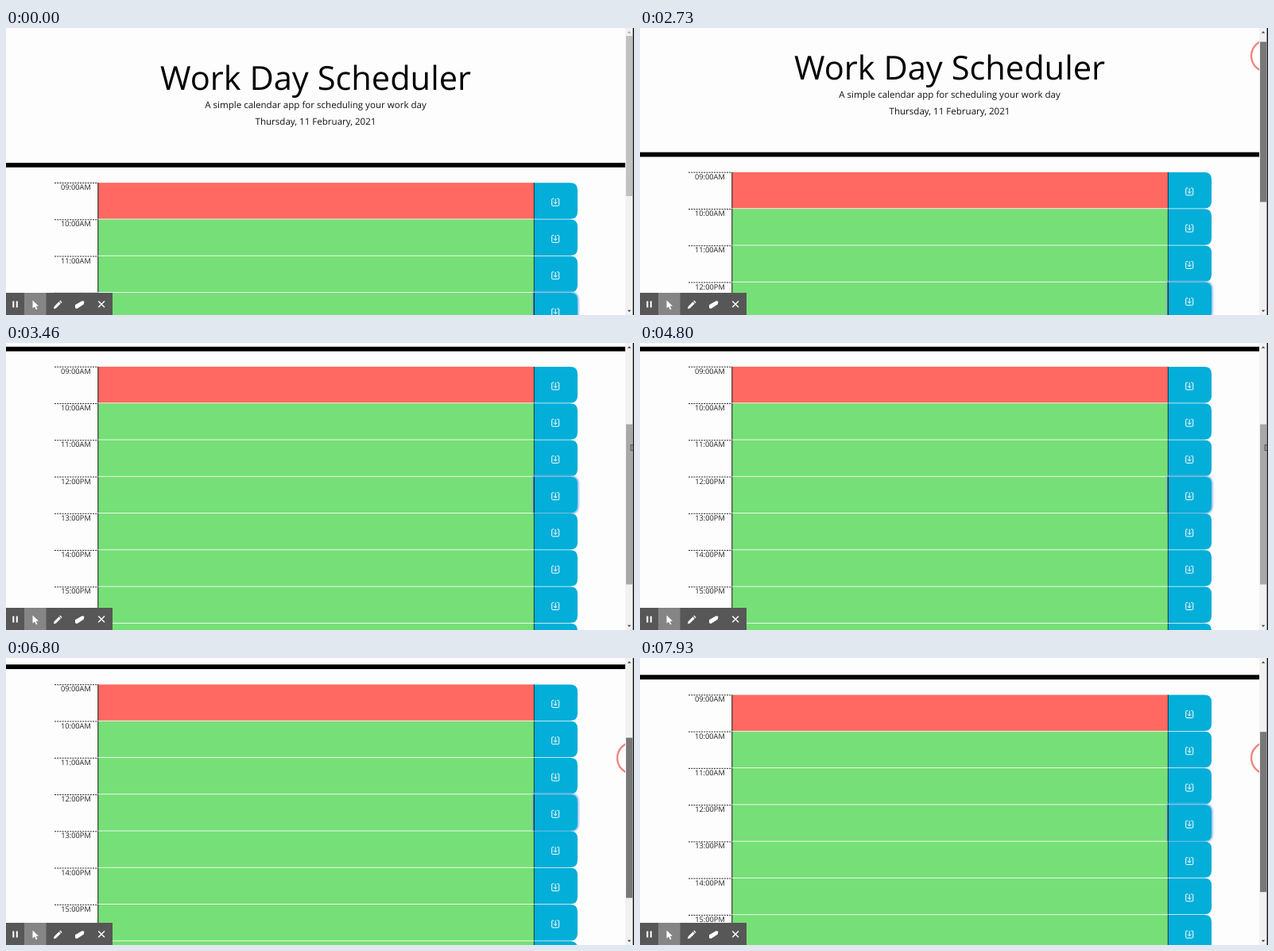
Recreate the animation shown at these times as an HTML page. Size 790 by 362 pixels, loop 8 s.

```html
<!DOCTYPE html>
<html lang="en">
<head>
<meta charset="utf-8">
<title>Work Day Scheduler</title>
<style>
  html, body { margin: 0; width: 100%; height: 100%; overflow: hidden; background: #fdfdfd; }
  svg { display: block; width: 790px; height: 362px; }
  text { font-family: "Open Sans", sans-serif; font-size: 11.57px; fill: #111; text-rendering: geometricPrecision; }
  .mid { text-anchor: middle; }
  .title { font-size: 41.6px; fill: #000; }
  .hour { font-size: 9.25px; text-anchor: end; fill: #222; }
</style>
</head>
<body>
<svg viewBox="0 0 790 362">
  <defs>
    <g id="save" fill="none" stroke="#fff" stroke-width="1">
      <path d="M-2 -4.5H-3.5Q-4.5 -4.5 -4.5 -3.5V3.5Q-4.5 4.5 -3.5 4.5H3.5Q4.5 4.5 4.5 3.5V-3.5Q4.5 -4.5 3.5 -4.5H2"/>
      <path d="M0 -4.5V2M-2.3 -.2L0 2.1L2.3 -.2"/>
    </g>
    <filter id="soft" x="-20%" y="-20%" width="140%" height="140%"><feGaussianBlur stdDeviation="1"/></filter>
  </defs>
  <rect width="790" height="362" fill="#fdfdfd"/>

  <g id="page">
    <text class="mid title" x="389.5" y="78.3">Work Day Scheduler</text>
    <text class="mid" x="389.5" y="101.3">A simple calendar app for scheduling your work day</text>
    <text class="mid" x="389.5" y="122.2">Thursday, 11 February, 2021</text>
    <rect y="170" width="779" height="5.8"/>
    <g id="rows"></g>
  </g>

  <circle id="ring" cx="789" r="20" fill="none" stroke="#f08580" stroke-width="2.4"/>

  <rect x="779" width="10" height="362" fill="#f1f1f1"/>
  <path id="up" d="M781.8 6.5L784 4L786.2 6.5Z"/>
  <path id="down" d="M781.8 355.8L784 358.3L786.2 355.8Z"/>
  <rect id="thumb" x="780" width="8" height="202"/>
  <rect x="788.6" width="1.4" height="362" fill="#111"/>
  <rect id="pointer" x="786" y="128.5" width="3" height="7" fill="#999" stroke="#444" stroke-width=".8"/>

  <g fill="#fff">
    <rect y="334" width="134" height="28" fill="#575757"/>
    <rect x="23" y="334" width="27.5" height="28" fill="#858585"/>
    <path d="M8.3 344.5h2v8h-2zM12.8 344.5h2v8h-2z"/>
    <path d="M33.5 343.5V353.6L36 351.4L37.9 355.3L39.5 354.5L37.7 350.8H41Z"/>
    <path d="M60 354.2L60.6 351.3L66.6 345.3L68.9 347.6L62.9 353.6ZM67.3 344.6L68.3 343.6L70.6 345.9L69.6 346.9Z"/>
    <path d="M87 349.2L95.6 344.2L98.4 344.8L97.8 348.6L89.4 354L87 353.2Z"/>
    <path d="M116.2 344.4L124 352.2M124 344.4L116.2 352.2" stroke="#fff" stroke-width="1.4"/>
  </g>
</svg>
<script>
const $ = id => document.getElementById(id);
const set = (id, name, value) => $(id).setAttribute(name, value);

const pitch = 46.27;
const button = "M664 0H710Q719 0 719 9V36.5Q719 45.5 710 45.5H664Z";
$("rows").innerHTML = Array.from({ length: 9 }, (_, i) => {
  const hour = 9 + i;
  const label = String(hour).padStart(2, "0") + (hour < 12 ? ":00AM" : ":00PM");
  const focus = i === 3;
  return `<g transform="translate(0 ${195.2 + i * pitch})">
    <path d="M61 .3H116" stroke="#222" stroke-dasharray="2 1.2"/>
    <text class="hour" x="106.8" y="8.9">${label}</text>
    <rect x="116" width="548" height="45.4" fill="${i ? "#76df77" : "#ff6961"}"/>
    <path d="M115.8 0V45.6" stroke="#111"/>
    ${focus ? `<path d="${button}" fill="none" stroke="#86b4e8" stroke-width="3" filter="url(#soft)"/>` : ""}
    <path d="${button}" fill="#03aed8"/>
    <path d="M664.3 0V45.5" stroke="#15323a" stroke-width="${focus ? 1.5 : 1}"/>
    <use href="#save" x="691.2" y="24.5"/>
  </g>`;
}).join("");

// [tick, scroll offset], 15 ticks per second
const keys = [
  [0, 0], [36, 0], [41, 13.3], [44, 68], [46, 117.3], [47, 138], [48, 151], [50, 164], [51, 165.3],
  [77, 165.3], [80, 205], [82, 237], [84, 249.8],
  [97, 249.8], [99, 232], [102, 161.8], [104, 112], [105, 100],
  [110, 100], [114, 125], [119, 148.7], [120, 148.7]
];

function scrollAt(tick) {
  const i = Math.max(1, keys.findIndex(k => k[0] >= tick));
  const [t0, s0] = keys[i - 1], [t1, s1] = keys[i];
  return s0 + (s1 - s0) * (tick - t0) / (t1 - t0);
}

function draw(now) {
  const tick = Math.floor((now % 8000 + 7) * 0.015) % 120;
  const s = scrollAt(tick);
  const first = tick >= 35 && tick < 52;
  const pressed = first || tick >= 77;
  set("page", "transform", `translate(0 ${-s})`);
  set("thumb", "y", 10 + s / 1.787);
  set("thumb", "fill", pressed ? "#787878" : tick < 11 ? "#c1c1c1" : "#a8a8a8");
  set("up", "fill", s > 0 ? "#444" : "#a3a3a3");
  set("down", "fill", s < 249 ? "#444" : "#a3a3a3");
  set("ring", "cy", first ? 35.3 : 126.3);
  set("ring", "visibility", pressed ? "visible" : "hidden");
  set("pointer", "visibility", tick >= 52 && tick < 77 ? "visible" : "hidden");
}

const start = performance.now();
function loop() {
  draw(performance.now() - start);
  requestAnimationFrame(loop);
}
loop();
</script>
</body>
</html>
```
